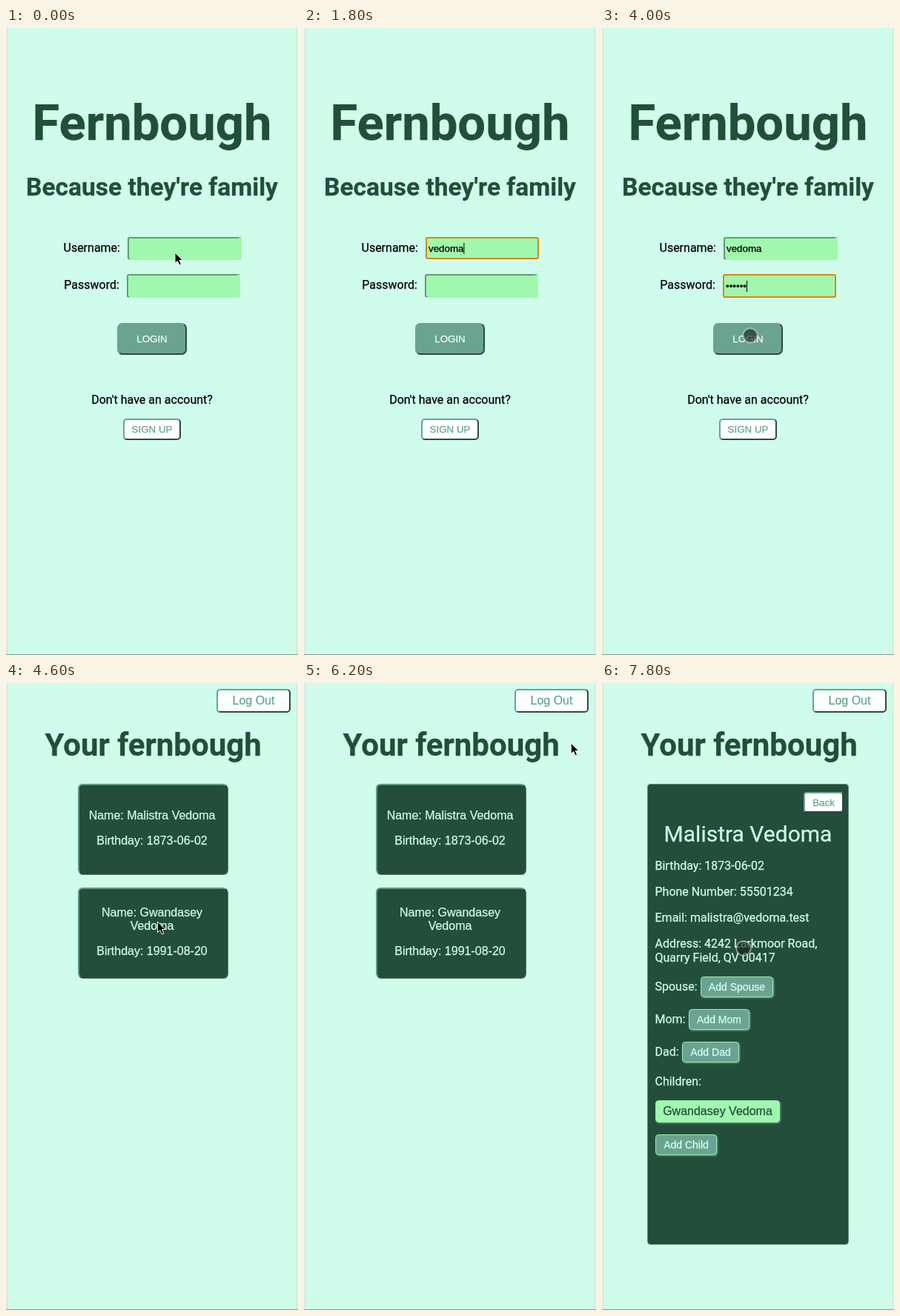
Animation, 394 px wide and 846 px high, one loop 8 s. Source, as an HTML page:

```html
<!DOCTYPE html>
<html lang="en">
<head>
<meta charset="utf-8">
<title>Family login demo</title>
<style>
  html, body { margin: 0; width: 100%; height: 100%; overflow: hidden; background: #d0fceb; }
  svg { display: block; width: 394px; height: 846px; font: 16px Roboto, sans-serif; --ink: #000; }
  /* A hairline stroke gives the slightly heavier type */
  text { white-space: pre; fill: var(--ink); stroke: var(--ink); stroke-width: .25; }
  .mid { text-anchor: middle; }
  .title { font-weight: 700; --ink: #204f3a; }
  .arial { font-family: 'Liberation Sans', Arial, sans-serif; }
  .small { font-size: 13.33px; }
  .ui { font-family: Inter, sans-serif; --ink: #1c1c1c; }
  .teal { --ink: #6ba392; }
  .mint { --ink: #d0fceb; }
  .pale { --ink: #f2fffa; }
  .grey { --ink: #5f6368; font-size: 12px; }
  .field { fill: #a0f8ae; stroke: url(#inset); stroke-width: 2; }
  .field.focus { stroke: #d6890f; }
  .white { fill: #fdfffe; stroke: url(#outset); stroke-width: 2; }
  .card { fill: #234e3a; stroke: url(#edge); stroke-width: 2; filter: drop-shadow(1.5px 1.5px .5px #5c6f66); }
  .add { --ink: #d8fff0; font-size: 14px; }
  .add rect { fill: #6ba392; stroke: #9beaab; filter: drop-shadow(1px 1px 1px #6ba392); }
  .add .child { fill: #a0f8ae; --ink: #234e3a; font-size: 16px; }
  .add text.child { fill: var(--ink); }
  .float { fill: #fdfdfd; filter: drop-shadow(0 1px 2px #0005); }
</style>
</head>
<body>
<svg viewBox="0 0 394 846">
  <defs>
    <linearGradient id="outset" x2="1" y2="1">
      <stop offset=".5" stop-color="#6ba392"/><stop offset=".5" stop-color="#2c4a44"/>
    </linearGradient>
    <linearGradient id="inset" x2="1" y2="1">
      <stop offset=".5" stop-color="#629b76"/><stop offset=".5" stop-color="#a0f8ae"/>
    </linearGradient>
    <linearGradient id="edge" x2="1" y2="1">
      <stop offset=".5" stop-color="#5f9a86"/><stop offset=".5" stop-color="#264a3b"/>
    </linearGradient>
  </defs>
  <rect width="394" height="846" fill="#d0fceb"/>

  <g id="login">
    <text class="title mid" x="197" y="151" font-size="67">Fernbough</text>
    <text class="title mid" x="197" y="226" font-size="33.5">Because they're family</text>
    <text x="77.5" y="302">Username:</text>
    <rect id="userBox" class="field" x="165" y="283" width="152" height="29" rx="2"/>
    <text id="user" class="arial small" x="168" y="302"></text>
    <text x="78.3" y="352">Password:</text>
    <rect id="passBox" class="field" x="164" y="333" width="151" height="30" rx="2"/>
    <text id="pass" class="arial small" x="167" y="353"></text>
    <rect id="caret" width="1" height="15"/>
    <rect x="151" y="399" width="92" height="41" rx="6" fill="#6ba392" stroke="url(#outset)" stroke-width="2"/>
    <text class="arial small mid pale" x="197" y="424">LOGIN</text>
    <text class="mid" x="197" y="507">Don't have an account?</text>
    <rect class="white" x="159" y="528" width="76" height="27" rx="4"/>
    <text class="arial small mid teal" x="197" y="546">SIGN UP</text>
    <g id="menu">
      <path id="menuBox" class="float"/>
      <g id="items" class="ui" font-size="13"></g>
    </g>
  </g>

  <g id="home">
    <rect class="white" x="285" y="9" width="98" height="30" rx="4"/>
    <text class="arial mid teal" x="334" y="29">Log Out</text>
    <text class="title" x="52.5" y="98" font-size="42">Your fernbough</text>
    <g id="cards" class="arial mid mint">
      <rect class="card" x="98" y="137" width="200" height="120" rx="5"/>
      <text x="197" y="184">Name: Malistra Vedoma</text>
      <text x="197" y="218">Birthday: 1873-06-02</text>
      <rect class="card" x="98" y="277" width="200" height="120" rx="5"/>
      <text x="197" y="315">Name: Gwandasey</text>
      <text x="197" y="333">Vedoma</text>
      <text x="197" y="367">Birthday: 1991-08-20</text>
    </g>
    <g id="detail">
      <rect x="61.5" y="136.5" width="271" height="621" rx="4" fill="#234e3a" stroke="#5f8f7c"/>
      <rect class="white" x="273" y="148" width="52" height="26" rx="3"/>
      <text class="arial small mid teal" x="299" y="166">Back</text>
      <text class="mid mint" x="197" y="214" font-size="30">Malistra Vedoma</text>
      <g class="mint">
        <text x="71.5" y="252">Birthday: 1873-06-02</text>
        <text x="71.5" y="287">Phone Number: 55501234</text>
        <text x="71.5" y="322">Email: malistra@vedoma.test</text>
        <text x="71.5" y="357">Address: 4242 Larkmoor Road,</text>
        <text x="71.5" y="376">Quarry Field, QV 00417</text>
        <text x="71.5" y="415">Spouse:</text>
        <text x="71.5" y="459">Mom:</text>
        <text x="71.5" y="503">Dad:</text>
        <text x="71.5" y="543">Children:</text>
      </g>
      <g class="add arial mid">
        <rect x="133.5" y="396.5" width="97" height="27" rx="4"/>
        <text x="182" y="415">Add Spouse</text>
        <rect x="117.5" y="440.5" width="81" height="27" rx="4"/>
        <text x="158" y="459">Add Mom</text>
        <rect x="108.5" y="484.5" width="76" height="27" rx="4"/>
        <text x="146.5" y="503">Add Dad</text>
        <rect class="child" x="72.5" y="563.5" width="167" height="29" rx="4"/>
        <text class="child" x="156" y="583">Gwandasey Vedoma</text>
        <rect x="72.5" y="609.5" width="82" height="27" rx="4"/>
        <text x="113.5" y="628">Add Child</text>
      </g>
    </g>
    <g id="popup" class="ui">
      <rect x="145" y="-20" width="300" height="202" fill="#fdfdfd" style="filter:drop-shadow(0 2px 5px #0009)"/>
      <rect x="145" width="249" height="16" fill="#f7f8f8"/>
      <rect x="257" y="-20" width="69" height="26" rx="4" fill="#fafafa" stroke="#dcdcdc" stroke-width="1.5"/>
      <text x="161" y="48" font-size="15">Change your password</text>
      <g class="grey">
        <text x="161" y="84">The password you just used was found in</text>
        <text x="161" y="104">Lockstone Keeper recommends changing it</text>
      </g>
      <circle cx="173" cy="150" r="6.3" fill="none" stroke="#5f6368" stroke-width="1.4"/>
      <path d="M173 146v1.6M173 149v4.4" stroke="#5f6368" stroke-width="1.5"/>
    </g>
  </g>

  <path d="M.5 0V846M393.5 0V846" stroke="#f1f6f4"/>
  <path d="M1.5 0V846M392.5 0V846" stroke="#cddcd7"/>
  <path d="M0 845.5H394" stroke="#8b9994"/>
  <path id="arrow" d="M0 0V14.5L3.4 11.5L5.8 17L8.4 15.9L6 10.5H10.5Z" stroke="#fff" stroke-linejoin="round"/>
  <circle id="press" r="9.7" fill="#14201a" fill-opacity=".62" stroke="#e4ece8" stroke-opacity=".5" stroke-width="2"/>
</svg>
<script>
const LOOP = 8000, STEP = 200, NAME = 'vedoma';
const SUGGESTIONS = ['bzonta4@mail.test', 'Belinor', 'hi', 'bzonta4', 'belinor', NAME];
const PRESSES = [600, 4000, 6800, 7800];
// time, x, y of the pointer
const PATH = [
  [0, 228, 303], [600, 229, 305], [3000, 228, 303], [3800, 200, 415], [4200, 200, 415],
  [5000, 209, 229], [5200, 209, 229], [5800, 410, 40], [6000, 410, 40],
  [6600, 218, 198], [7000, 218, 198], [7600, 191, 358], [8000, 191, 358]
];

const el = id => document.getElementById(id);
const show = (id, on) => { el(id).style.display = on ? '' : 'none'; };
const typed = (t, start) => Math.max(0, Math.min(NAME.length, Math.floor((t - start) / STEP * 1.5)));

function pointer(t) {
  const i = PATH.findIndex(p => p[0] > t);
  const [t0, x0, y0] = PATH[i - 1], [t1, x1, y1] = PATH[i];
  const u = (t - t0) / (t1 - t0), e = u * u * (3 - 2 * u);
  return [x0 + (x1 - x0) * e, y0 + (y1 - y0) * e];
}

function drawMenu(items) {
  const bottom = 323 + 8 + 36 * items.length;
  el('menuBox').setAttribute('d',
    `M223 323H230L238.5 315L247 323H371Q375 323 375 327V${bottom - 4}Q375 ${bottom} 371 ${bottom}H223Q219 ${bottom} 219 ${bottom - 4}V327Q219 323 223 323Z`);
  el('items').innerHTML = items.map((s, i) => `<text x="231" y="${350 + 36 * i}">${s}</text>`).join('');
}

function drawLogin(t) {
  const inUser = t >= 600 && t < 2200, inPass = t >= 2200;
  const letters = typed(t, 800), dots = typed(t, 2200);
  el('user').textContent = NAME.slice(0, letters);
  el('pass').textContent = '•'.repeat(dots);
  el('userBox').classList.toggle('focus', inUser);
  el('passBox').classList.toggle('focus', inPass);
  // The focus ring sits one pixel inside the bevel
  el('userBox').setAttribute('width', inUser ? 151 : 152);
  el('userBox').setAttribute('height', inUser ? 28 : 29);
  show('caret', inUser || inPass);
  const field = el(inPass ? 'pass' : 'user');
  el('caret').setAttribute('x', (inPass ? 167 : 168) + field.getComputedTextLength());
  el('caret').setAttribute('y', inPass ? 341 : 290);
  show('menu', inUser && letters < NAME.length);
  drawMenu(letters ? [NAME] : SUGGESTIONS);
}

function draw(now) {
  const t = Math.floor(now % LOOP / STEP) * STEP;
  const home = t >= 4400, detail = t >= 7000;
  show('login', !home);
  show('home', home);
  show('cards', !detail);
  show('detail', detail);
  show('popup', t >= 4800 && t < 6000);
  if (!home) drawLogin(t);

  const pressed = PRESSES.includes(t), [x, y] = pointer(t);
  show('press', pressed);
  show('arrow', !pressed && !(t >= 1000 && t < 3200));
  for (const id of ['arrow', 'press']) el(id).setAttribute('transform', `translate(${x} ${y})`);
}

const start = performance.now();
function tick() {
  draw(performance.now() - start);
  requestAnimationFrame(tick);
}
tick();
</script>
</body>
</html>
```
